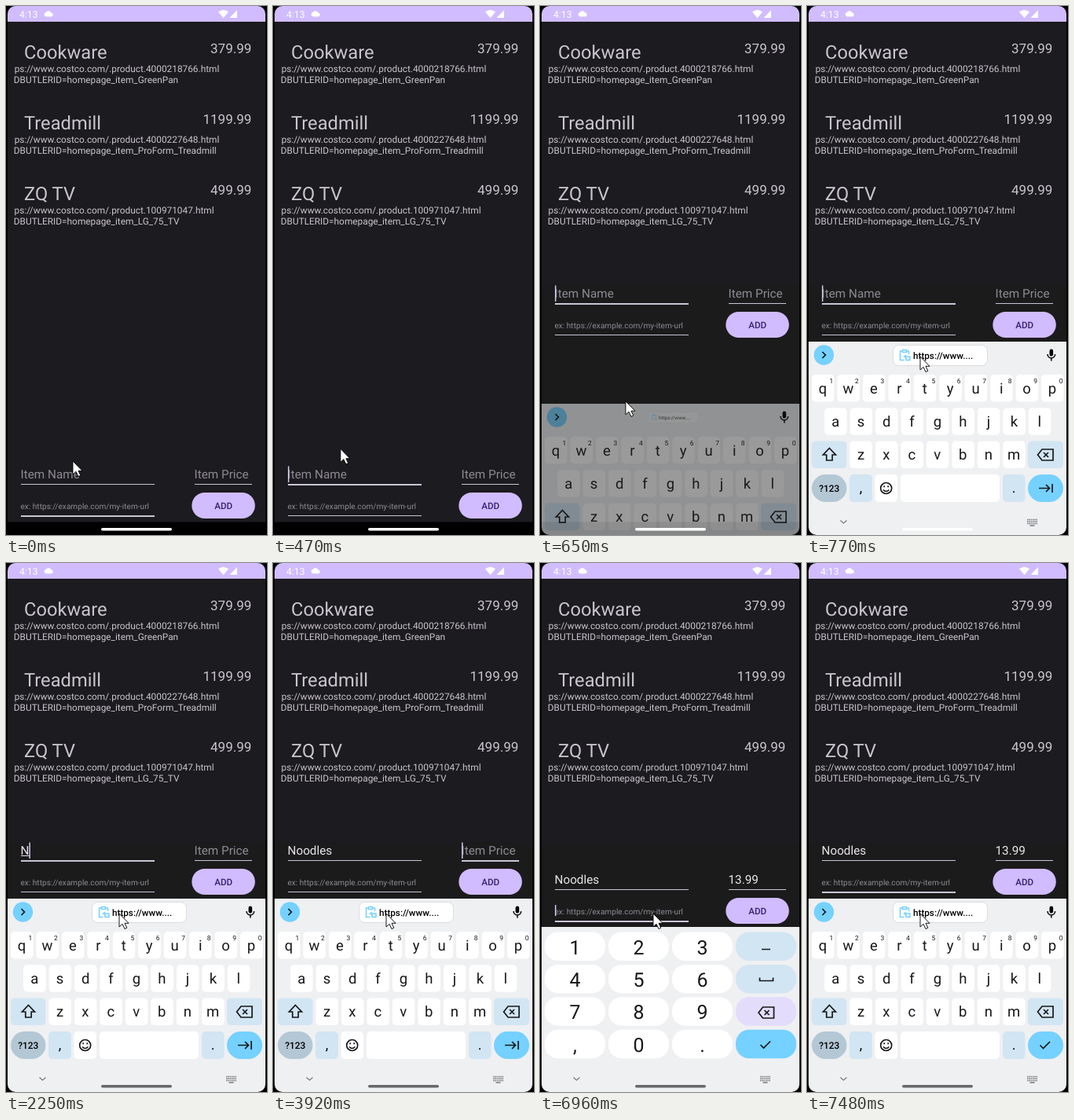
An HTML page for the animation above (7.99 s loop, 332x673 px).

```html
<!DOCTYPE html>
<html lang="en">
<head>
<meta charset="utf-8">
<title>Wish list</title>
<style>
  html, body { margin: 0; width: 100%; height: 100%; overflow: hidden; background: #000; }
  svg { display: block; width: 332px; height: 673px; font-family: Roboto, sans-serif; text-rendering: geometricPrecision; }
  .line { fill: none; stroke: #17181a; stroke-width: 1.7; }
</style>
</head>
<body>
<svg viewBox="0 0 332 673">
  <defs>
    <clipPath id="screen"><rect x="2" width="328" height="673" rx="10"/></clipPath>
    <clipPath id="column"><rect x="10" y="20" width="300" height="330"/></clipPath>
  </defs>
  <g clip-path="url(#screen)">
    <rect width="332" height="673" fill="#1c1b1f"/>
    <rect id="panel" y="355" width="332" height="318" fill="#1b1b1c"/>
    <rect width="332" height="20" fill="#d0bcff"/>
    <g fill="#fff">
      <text x="17" y="15" font-size="12.2">4:13</text>
      <path d="M51 13.500a2.800 2.800 0 0 1-.3-5.500a3.800 3.800 0 0 1 6.800.6a2.500 2.500 0 0 1 .5 4.900z"/>
      <path d="M270 7.500q6.500-5 13 0l-6.500 7.700z"/>
      <path d="M284.500 15L294 5.200V15z"/>
    </g>
    <g id="list" fill="#cac5cd"></g>
    <g id="form">
      <text id="name" x="18.500" y="601" font-size="15.300"></text>
      <text id="price" x="239.500" y="601" font-size="15.300"></text>
      <text x="18.500" y="639.500" font-size="10.100" fill="#8e8b92">ex: https://example.com/my-item-url</text>
      <g fill="#cbc4d6">
        <rect id="nameLine" x="19" y="608" width="170"/>
        <rect id="priceLine" x="240" y="608" width="73"/>
        <rect id="urlLine" x="19" y="648" width="170"/>
      </g>
      <rect id="compose" x="19" y="602" height="1" fill="#e6e1e5"/>
      <rect id="caret" width="1.500" fill="#d0c6e6"/>
      <rect x="236.300" y="619" width="80.500" height="33" rx="16.500" fill="#d0bcff"/>
      <text x="276.700" y="640" font-size="11.600" font-weight="500" text-anchor="middle" fill="#381e72">ADD</text>
    </g>
    <rect y="656.500" width="332" height="17"/>
    <g id="board">
      <rect id="boardBack" width="332" height="300" fill="#eff0f2"/>
      <g id="qwerty"></g>
      <g id="numpad"></g>
      <path d="M42.500 654.500l4 3.500l4-3.500" fill="none" stroke="#777a7e" stroke-width="1.300"/>
      <path d="M280 653.500h13M280 656h13M280 658.500h13" stroke="#777a7e" stroke-width="1.500" stroke-dasharray="1.600 .7"/>
      <path d="M283.500 661h6" stroke="#777a7e" stroke-width="1.300"/>
    </g>
    <rect id="pill" x="121" y="664" width="90" height="3.600" rx="1.800"/>
    <path id="mouse" d="M0 0V17L4 13.300L7 19.500L9.800 18.200L7 12.300H12z" fill="#fff" stroke="#000" stroke-width=".9"/>
  </g>
</svg>
<script>
const LOOP = 7990;
const BLUE = '#75d1ff', PALE = '#d2e5f3';
const el = {};
document.querySelectorAll('[id]').forEach(e => el[e.id] = e);

const set = (e, attrs) => { for (const k in attrs) e.setAttribute(k, attrs[k]); };
const show = (e, on) => { e.style.display = on ? '' : 'none'; };
const key = (x, y, w, h, fill = '#fff', r = 5) =>
  `<rect x="${x}" y="${y}" width="${w}" height="${h}" rx="${r}" fill="${fill}"/>`;
const label = (s, x, y, size, extra = 'text-anchor="middle"') =>
  `<text x="${x}" y="${y}" font-size="${size}" ${extra}>${s}</text>`;
const icon = (d, extra = '') => `<path class="line" d="${d}" ${extra}/>`;
const erase = (x, y) => icon(`M${x - 10} ${y}l5.500-7h14v14h-14zM${x - 2.5} ${y - 3}l6 6m0-6l-6 6`);
const check = (x, y) => icon(`M${x - 6} ${y}l4 4l8.500-8.500`);

// List rows
el.list.innerHTML = [
  ['Cookware', '379.99', 271.3, '4000218766', 'GreenPan'],
  ['Treadmill', '1199.99', 271.3, '4000227648', 'ProForm_Treadmill'],
  ['ZQ TV', '499.99', 264.6, '100971047', 'LG_75_TV']
].map(([title, cost, right, id, tag], i) => {
  const y = 90 * i;
  return label(title, 23, 67 + y, 23.7, '') +
    label(cost, 312.3, 60 + y, 17, 'text-anchor="end"') +
    '<g clip-path="url(#column)">' +
    label(`https://www.costco.com/.product.${id}.html`, right, 84 + y, 11.85, 'text-anchor="end"') +
    label(`DBUTLERID=homepage_item_${tag}`, 9.8, 98 + y, 11.85, '') + '</g>';
}).join('');

// Letter keyboard
function letterKeys() {
  const rows = [['qwertyuiop', 20, 469], ['asdfghjkl', 36.2, 511.3], ['zxcvbnm', 68.5, 553.6]];
  let keys = '', letters = '';
  for (const [chars, x0, y] of rows) [...chars].forEach((c, i) => {
    const x = x0 + i * 32.45;
    keys += key(x - 14, y, 28.5, 34.5);
    letters += label(c, x, y + 23.5, 18.5);
    if (y === 469) letters += label((i + 1) % 10, x + 11, y + 10.5, 8.5);
  });
  return keys + `<g id="letters" fill="#17181a">${letters}</g>`;
}
el.qwerty.innerHTML =
  `<circle cx="21.500" cy="444" r="12.700" fill="${BLUE}"/>` + icon('M19.500 440l4 4l-4 4') +
  '<g id="chip">' +
  '<rect x="109.500" y="431.500" width="120" height="26" rx="7" fill="#fff" stroke="#d9dbde"/>' +
  `<path d="M122 439h-3.500v11.500h5M126 439h3.500v4M121.500 437.500h5v3h-5zM131 446h-5v4.500h5zM126 444l-2.500 2l2.500 2" fill="none" stroke="${BLUE}" stroke-width="1.500"/>` +
  label('https://www....', 135, 448.5, 11.7, 'font-weight="500"') + '</g>' +
  '<rect x="308.500" y="436.500" width="4.600" height="9" rx="2.300"/>' +
  icon('M306 443a4.800 4.800 0 0 0 9.600 0M310.800 448v3.500') +
  letterKeys() +
  key(6, 553.6, 44.5, 34.5, PALE) +
  icon('M28.500 562.500l8 8.500h-4.300v7h-7.400v-7h-4.300z', 'id="shift"') +
  key(281, 553.6, 45, 34.5, PALE) + erase(303.5, 571) +
  key(6, 596, 44.5, 35, '#b4c7d5', 17.5) + label('?123', 28.3, 618, 12, 'text-anchor="middle" font-weight="500"') +
  key(54, 596, 29, 35, PALE) + label(',', 68.5, 619, 18) +
  key(86.5, 596, 28.5, 35) +
  '<circle class="line" cx="100.700" cy="613.500" r="7"/>' +
  icon('M97 615.500q3.700 4 7.400 0M98.200 610.200v2M103.200 610.200v2') +
  key(119, 596, 126, 35) +
  key(249, 596, 28.5, 35, PALE) + label('.', 263.2, 619, 18) +
  key(281, 596, 45, 35, BLUE, 17.5) +
  `<g id="tab">${icon('M295 613.500h13.500M304 609l4.500 4.500l-4.500 4.500M312 608v11')}</g>` +
  `<g id="done">${check(302.5, 613.5)}</g>`;

// Number keyboard
const pad = ['123', '456', '789', ',0.'];
el.numpad.innerHTML = pad.map((row, r) => {
  const y = 469.5 + r * 41.4;
  return [...row].map((c, i) =>
    key(6 + 81 * i, y, 77, 36.5, '#fff', 17) +
    label(c, 44.5 + 81 * i, y + 28, 25, 'text-anchor="middle" fill="#17181a"')).join('') +
    key(249, y, 77, 36.5, [PALE, PALE, '#e4dcfb', BLUE][r], 17);
}).join('') + icon('M282 491.500h11') + icon('M279.500 527.500v4h17v-4') + erase(288, 572) + check(286.5, 613);

['letters', 'chip', 'shift', 'tab', 'done'].forEach(id => el[id] = document.getElementById(id));

const nameTimes = [2180, 2490, 2640, 2820, 3070, 3320, 3490];
const priceTimes = [5270, 5510, 5660, 6000, 6130];
const carets = [763, ...nameTimes, 3915, ...priceTimes, 6960];
const path = [[70, 85, 579], [200, 81.5, 590], [370, 81.5, 590], [590, 91, 532], [770, 144, 446]];
const typed = (s, times, t) => s.slice(0, times.filter(k => k <= t).length);

function mouseAt(t) {
  if (t <= path[0][0]) return path[0].slice(1);
  for (let i = 1; i < path.length; i++) {
    const [t0, x0, y0] = path[i - 1], [t1, x1, y1] = path[i];
    if (t < t1) {
      const p = (t - t0) / (t1 - t0);
      return [x0 + (x1 - x0) * p, y0 + (y1 - y0) * p];
    }
  }
  return path[path.length - 1].slice(1);
}

function field(e, value, hint) {
  e.textContent = value || hint;
  set(e, { fill: value ? '#eae6ea' : '#8e8b92' });
}

function draw(t) {
  const up = t >= 500;
  const numeric = t >= 3970 && t < 7020;
  const focus = t < 380 || t >= 6960 ? 'url' : t < 3915 ? 'name' : 'price';

  // Form
  const name = typed('Noodles', nameTimes, t), price = typed('13.99', priceTimes, t);
  field(el.name, name, 'Item Name');
  field(el.price, price, 'Item Price');
  for (const f of ['name', 'price', 'url']) set(el[f + 'Line'], { height: f === focus ? 2 : 1 });
  set(el.form, { transform: `translate(0 ${!up ? 0 : numeric ? -193 : -230})` });
  show(el.panel, up);

  const composing = name && focus === 'name';
  show(el.compose, composing);
  if (composing) set(el.compose, { width: el.name.getComputedTextLength() });

  const last = carets.filter(k => k <= t).pop() ?? t;
  show(el.caret, t >= 380 && Math.floor((t - last) / 507) % 2 === 0);
  const width = focus === 'name' && name ? el.name.getComputedTextLength()
    : focus === 'price' && price ? el.price.getComputedTextLength() : 0;
  set(el.caret, {
    x: (focus === 'price' ? 240 : 19) + Math.max(0, width - .5),
    y: focus === 'url' ? 628 : 585.5,
    height: focus === 'url' ? 14 : 20.5
  });

  // Keyboard slides in at a coarse 60 ms cadence
  const stepped = 530 + Math.floor((t - 530) / 60) * 60;
  const p = Math.min(1, Math.max(0, (stepped - 500) / 270));
  set(el.board, { transform: `translate(0 ${Math.round(246 * (1 - p) ** 1.4)})`, opacity: p });
  set(el.boardBack, { y: numeric ? 463 : 427 });
  show(el.qwerty, !numeric);
  show(el.numpad, numeric);
  const s = p < 1 ? .2 + .6 * p : 1;
  set(el.chip, { transform: `translate(169.500 444.500) scale(${s}) translate(-169.500 -444.500)`, opacity: p });
  const caps = t >= 2100 && t < 2250;
  el.letters.style.textTransform = caps ? 'uppercase' : 'none';
  el.shift.style.fill = caps ? '#17181a' : 'none';
  show(el.tab, t < 7020);
  show(el.done, t >= 7020);

  // System bar and pointer
  const grey = t < 1050 ? 255 : t < 1270 ? 205 : t < 1380 ? 150 : 104;
  set(el.pill, { fill: `rgb(${grey},${grey},${grey})` });
  set(el.mouse, { transform: `translate(${mouseAt(t)})` });
}

const start = performance.now();
function tick() {
  draw((performance.now() - start) % LOOP);
  requestAnimationFrame(tick);
}
tick();
</script>
</body>
</html>
```
